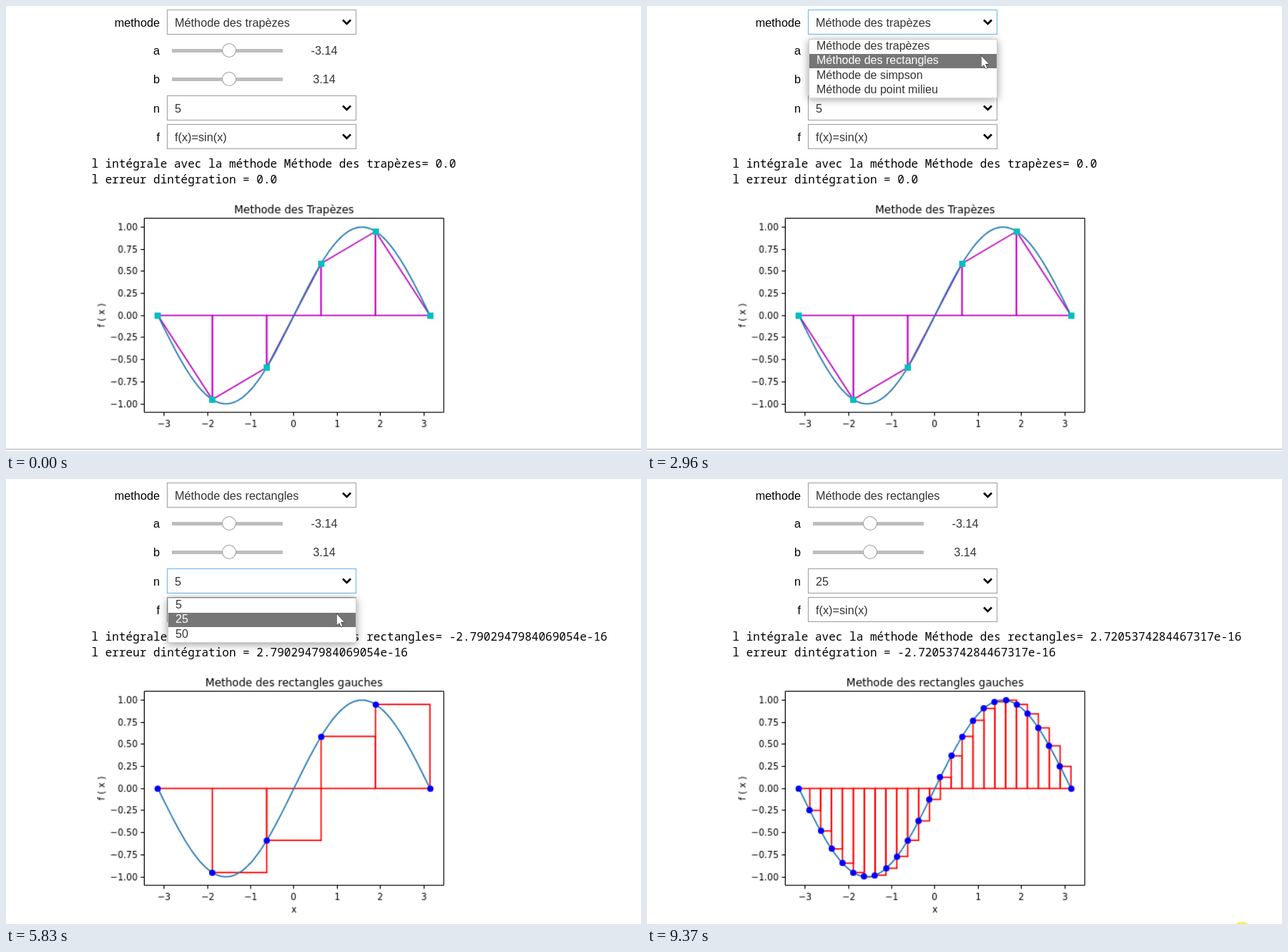
These frames come from a looping animation (888x622 px, 9640 ms). An HTML page with a canvas:

```html
<!DOCTYPE html>
<html lang="fr">
<head>
<meta charset="utf-8">
<style>
  html, body { margin: 0; width: 100%; height: 100%; overflow: hidden; background: #fff; }
  canvas { display: block; }
</style>
</head>
<body>
<canvas id="stage" width="888" height="622"></canvas>
<script>
const stage = document.getElementById('stage').getContext('2d');
let ctx = stage;
const LOOP = 9640;
const UI = '16.25px "Liberation Sans", Arial, sans-serif';
const OPTION = '16px "Liberation Sans", Arial, sans-serif';
const MONO = '16.04px "Noto Sans Mono", monospace';
const PLOT = '10px "DejaVu Sans", sans-serif';
const TITLE = '12px "DejaVu Sans", sans-serif';

const METHODS = ['Méthode des trapèzes', 'Méthode des rectangles', 'Méthode de simpson', 'Méthode du point milieu'];
const COUNTS = ['5', '25', '50'];

// Pointer moves: start, end, number of steps, target x, target y, sideways bow
const MOVES = [
  [460, 460, 1, 703, 470], [525, 590, 2, 546, 191],
  [850, 1690, 13, 480, 27], [2480, 3030, 9, 466, 71],
  [4250, 4730, 8, 476, 138, 7], [5480, 5900, 7, 462, 189],
  [6040, 6040, 1, 462, 190], [8090, 8090, 1, 630, 306],
  [8160, 8900, 12, 830, 612], [8970, 8970, 1, 832, 634]
];
const CLICKS = [[1890, 2090], [3380, 3640], [5000, 5220], [6300, 6560], [9370, LOOP]];

const between = (t, from, to) => t >= from && t < to;

function text(str, x, y, font, color = '#000', align = 'left') {
  ctx.font = font;
  ctx.fillStyle = color;
  ctx.textAlign = align;
  ctx.fillText(str, x, y);
}

function line(points, color, width, close) {
  ctx.beginPath();
  points.forEach(([x, y]) => ctx.lineTo(x, y));
  if (close) ctx.closePath();
  ctx.strokeStyle = color;
  ctx.lineWidth = width;
  ctx.stroke();
}

function disc(x, y, r, color) {
  ctx.beginPath();
  ctx.arc(x, y, r, 0, 7);
  ctx.fillStyle = color;
  ctx.fill();
}

function select(label, value, y, focused) {
  text(label, 215, y + 24, UI, '#000', 'right');
  ctx.strokeStyle = focused ? '#64b5f6' : '#9e9e9e';
  ctx.lineWidth = 1;
  ctx.strokeRect(225.5, y + .5, 264, 34);
  text(value, 236, y + 24, UI, '#333');
  line([[471, y + 14.5], [476.5, y + 20], [482, y + 14.5]], '#000', 2.6);
}

function slider(label, value, y) {
  text(label, 215, y + 6, UI, '#000', 'right');
  ctx.fillStyle = '#bdbdbd';
  ctx.fillRect(232, y - 2, 155, 5);
  disc(312, y, 10, '#9e9e9e');
  disc(312, y, 9, '#fff');
  text(value, 445, y + 6, UI, '#333', 'center');
}

function dropdown(items, y, pointerY) {
  const rowHeight = 20.3, height = items.length * rowHeight + 2;
  const active = Math.max(0, Math.floor((pointerY - y - 1) / rowHeight));
  ctx.save();
  ctx.shadowColor = 'rgba(0,0,0,.4)';
  ctx.shadowBlur = 11;
  ctx.shadowOffsetY = 2;
  ctx.fillStyle = '#fff';
  ctx.fillRect(226, y, 264, height);
  ctx.restore();
  ctx.strokeStyle = '#ccc';
  ctx.lineWidth = 1;
  ctx.strokeRect(226.5, y + .5, 263, height - 1);
  items.forEach((item, i) => {
    const top = Math.round(y + 1 + i * rowHeight);
    if (i === active) {
      ctx.fillStyle = '#767676';
      ctx.fillRect(227, top, 262, 20);
    }
    text(item, 237, top + 14, OPTION, i === active ? '#fff' : '#333');
  });
}

// The figure is drawn at its own resolution and shown at 125 %.
const AXES = { x: 59.5, y: 24.5, width: 334.8, height: 217.4 };
const px = x => AXES.x + AXES.width * (.5 + x / (2.2 * Math.PI));
const py = y => AXES.y + AXES.height * (.5 - y / 2.2);
const pixel = v => Math.floor(v) + .5;

function axes(title, xLabel) {
  const { x: left, y: top } = AXES;
  const right = pixel(left + AXES.width), bottom = pixel(top + AXES.height);
  text(title, 227, 18.5, TITLE, '#000', 'center');
  line([[left, top], [right, top], [right, bottom], [left, bottom]], '#000', 1, true);
  const sign = v => v < 0 ? '−' : '';
  for (let v = -3; v <= 3; v++) {
    const x = pixel(px(v));
    line([[x, bottom], [x, bottom + 4]], '#000', 1);
    text(sign(v) + Math.abs(v), x, 258, PLOT, '#000', 'center');
  }
  for (let v = -1; v <= 1; v += .25) {
    const y = pixel(py(v));
    line([[left - 4, y], [left, y]], '#000', 1);
    text(sign(v) + Math.abs(v).toFixed(2), 52, Math.round(y + 3.8), PLOT, '#000', 'right');
  }
  ctx.save();
  ctx.translate(15, 133);
  ctx.rotate(-Math.PI / 2);
  text('f ( x )', 0, 0, PLOT, '#000', 'center');
  ctx.restore();
  text(xLabel, 227, 272, PLOT, '#000', 'center');
}

function figure(n, rectangles) {
  const canvas = document.createElement('canvas');
  canvas.width = 402;
  canvas.height = 280;
  ctx = canvas.getContext('2d');
  ctx.fillStyle = '#fff';
  ctx.fillRect(0, 0, canvas.width, canvas.height);

  axes(rectangles ? 'Methode des rectangles gauches' : 'Methode des Trapèzes', rectangles ? 'x' : '');
  const nodes = Array.from({ length: n + 1 }, (_, i) => {
    const x = -Math.PI + i * 2 * Math.PI / n;
    return [px(x), py(Math.sin(x))];
  });
  for (let i = 0; i < n; i++) {
    const [x0, y0] = nodes[i], [x1, y1] = nodes[i + 1];
    line([[x0, py(0)], [x0, y0], [x1, rectangles ? y0 : y1], [x1, py(0)]],
      rectangles ? '#f00' : '#bf00bf', 1.5, true);
  }
  const curve = [];
  for (let i = 0; i <= 100; i++) {
    const x = (i / 50 - 1) * Math.PI;
    curve.push([px(x), py(Math.sin(x))]);
  }
  line(curve, '#1f77b4', 1.5);
  for (const [x, y] of nodes) {
    if (rectangles) {
      disc(pixel(x), pixel(y), 3.5, '#00f');
    } else {
      ctx.fillStyle = '#00bfbf';
      ctx.fillRect(pixel(x) - 3.5, pixel(y) - 3.5, 7, 7);
    }
  }
  ctx = stage;
  return canvas;
}

const trapezoids = figure(5, false), coarse = figure(5, true), fine = figure(25, true);

function output(method, integral, error, plot) {
  text(`l intégrale avec la méthode ${method}= ${integral}`, 119.5, 226, MONO);
  text(`l erreur dintégration = ${error}`, 119.5, 248, MONO);
  ctx.drawImage(plot, 119, 266, plot.width * 1.25, plot.height * 1.25);
}

function pointerAt(t) {
  let x = 703, y = 470;
  for (const [start, end, steps, toX, toY, bow = 0] of MOVES) {
    if (t < start) break;
    const step = t >= end ? steps : 1 + Math.floor((t - start) / (end - start) * (steps - 1));
    const s = 1 - (1 - step / steps) ** 2;
    x += (toX - x) * s + bow * Math.sin(Math.PI * s);
    y += (toY - y) * s;
  }
  return [Math.round(x), Math.round(y)];
}

function pointer(x, y) {
  const shape = [[.5, .5], [.5, 16.5], [4, 13.2], [6.6, 18.5], [8.6, 17.6], [6.2, 12], [11, 12]];
  const points = shape.map(([dx, dy]) => [x + dx, y + dy]);
  line(points, '#000', 1, true);
  ctx.fillStyle = '#fff';
  ctx.fill();
}

function halo(x, y) {
  ctx.globalCompositeOperation = 'multiply';
  disc(x, y, 15, '#fcee46');
  ctx.globalCompositeOperation = 'source-over';
}

function draw(t) {
  const [x, y] = pointerAt(t);
  ctx.fillStyle = '#fff';
  ctx.fillRect(0, 0, 888, 622);

  select('methode', METHODS[t < 3580 ? 0 : 1], 5, between(t, 1890, 5000));
  slider('a', '-3.14', 62);
  slider('b', '3.14', 102);
  select('n', COUNTS[t < 6500 ? 0 : 1], 125, between(t, 5000, 9370));
  select('f', 'f(x)=sin(x)', 165);

  if (t < 3840) {
    output(METHODS[0], '0.0', '0.0', trapezoids);
    ctx.fillStyle = '#aaa';
    ctx.fillRect(0, 619, 888, 1);
  } else if (t < 6760) {
    output(METHODS[1], '-2.7902947984069054e-16', '2.7902947984069054e-16', coarse);
  } else {
    output(METHODS[1], '2.7205374284467317e-16', '-2.7205374284467317e-16', fine);
  }

  if (between(t, 1960, 3580)) dropdown(METHODS, 46, y);
  if (between(t, 5000, 6500)) dropdown(COUNTS, 166, y);

  if (t >= 460) pointer(x, y);
  if (CLICKS.some(([from, to]) => between(t, from, to))) halo(x, y);
}

function frame() {
  draw(performance.now() % LOOP);
  requestAnimationFrame(frame);
}
frame();
</script>
</body>
</html>
```
